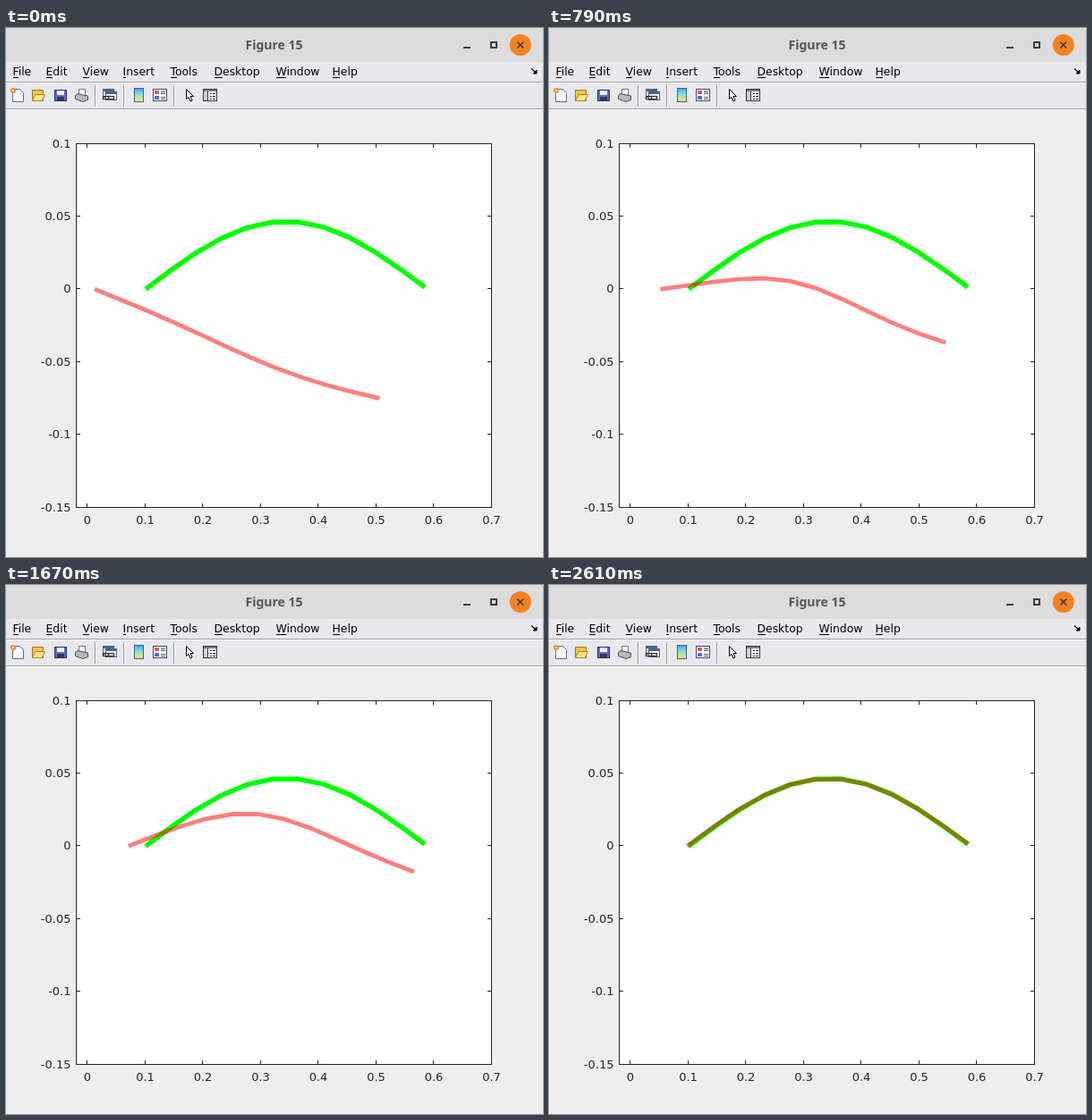
These frames come from a looping animation (600 px wide and 592 px high, 2640 ms). An HTML page with a canvas:

```html
<!DOCTYPE html>
<html>
<head>
<meta charset="utf-8">
<style>
  html, body { margin: 0; width: 100%; height: 100%; overflow: hidden; background: #eee; }
  canvas { display: block; }
</style>
</head>
<body>
<canvas id="stage" width="600" height="592"></canvas>
<script>
const ctx = document.getElementById('stage').getContext('2d');
const LOOP = 2640;
const STEPS = 10;
const STEPS_END = 2210;
const SEGMENTS = 11;
const ZERO_Y = 292.3;
const INK = '#262626';
const BOWS = [-8.7, 10, 32.7, 46, 54, 74.5];

const mix = (a, b, k) => a + (b - a) * k;
const wave = (n, u) => Math.sin(n * Math.PI * u);

// The pose jumps in steps that come quickly at both ends and slowly between.
const stepTime = n => STEPS_END * n / STEPS - 165 * wave(2, n / STEPS);

function progressAt(t) {
  let n = 0;
  while (n < STEPS && stepTime(n + 1) <= t) n++;
  return n / STEPS;
}

// A straight rod from x0 to x1 that rises by `rise`, bent by three sine modes.
function rod({ x0, x1, rise, bow, skew = 0, ripple = 0 }) {
  return Array.from({ length: SEGMENTS + 1 }, (_, i) => {
    const u = i / SEGMENTS;
    const h = rise * u + bow * wave(1, u) + skew * wave(2, u) + ripple * wave(3, u);
    return [mix(x0, x1, u), ZERO_Y - h];
  });
}

// First the tip travels to its goal, then the bow closes the remaining gap.
function movingRod(progress) {
  const k = progress * (BOWS.length - 1);
  const i = Math.min(Math.floor(k), BOWS.length - 2);
  const reach = Math.min(k, 4), late = k - reach;
  return rod({
    x0: 99 + 12.6 * reach + 5 * late,
    x1: 417.5 + 12.8 * reach,
    rise: -122 + 31.1 * reach,
    bow: mix(BOWS[i], BOWS[i + 1], k - i),
    skew: (3.5 + 0.5 * reach) * (1 - late),
    ripple: -3 * wave(1, reach / 4)
  });
}

function rect(x, y, w, h, color) {
  ctx.fillStyle = color;
  ctx.fillRect(x, y, w, h);
}

function frame(x, y, w, h, fill, stroke) {
  rect(x, y, w, h, stroke);
  rect(x + 1, y + 1, w - 2, h - 2, fill);
}

function line(points, color, width = 1) {
  ctx.beginPath();
  points.forEach(([x, y]) => ctx.lineTo(x, y));
  ctx.strokeStyle = color;
  ctx.lineWidth = width;
  ctx.stroke();
}

function poly(points, fill, stroke = fill) {
  ctx.beginPath();
  points.forEach(([x, y]) => ctx.lineTo(x, y));
  ctx.closePath();
  ctx.fillStyle = fill;
  ctx.strokeStyle = stroke;
  ctx.lineWidth = 1;
  ctx.fill();
  ctx.stroke();
}

function disc(x, y, r, color) {
  ctx.beginPath();
  ctx.arc(x, y, r, 0, Math.PI * 2);
  ctx.fillStyle = color;
  ctx.fill();
}

function text(s, x, y, font, color, align = 'left') {
  ctx.font = font;
  ctx.fillStyle = color;
  ctx.textAlign = align;
  ctx.fillText(s, x, y);
}

function titleBar() {
  rect(0, 0, 600, 38, '#dcdcdc');
  text('Figure 15', 299.5, 24, 'bold 14px "Noto Sans", sans-serif', '#555', 'center');
  rect(511, 21, 8, 2, '#3c3c3c');
  ctx.strokeStyle = '#3c3c3c';
  ctx.lineWidth = 2;
  ctx.strokeRect(542, 16, 6, 6);
  disc(574.8, 19, 12, '#f58220');
  line([[571.3, 15.5], [578.3, 22.5]], '#3c3c3c', 1.7);
  line([[578.3, 15.5], [571.3, 22.5]], '#3c3c3c', 1.7);
}

function menuBar() {
  rect(0, 38, 600, 53, '#e9e8ed');
  const items = { File: 8, Edit: 45, View: 86, Insert: 131, Tools: 184, Desktop: 233, Window: 302, Help: 365 };
  for (const [label, x] of Object.entries(items)) {
    text(label, x - 0.5, 53, '12.4px "DejaVu Sans", sans-serif', '#000');
    rect(x, 55, Math.round(ctx.measureText(label[0]).width) - 1, 1, '#000');
  }
  line([[587, 45.5], [592, 50]], '#111', 1.3);
  poly([[593, 47], [593, 51], [589, 51]], '#111');
  for (const y of [60, 90]) {
    rect(0, y, 600, 1, '#a3a2a8');
    rect(0, y + 1, 600, 1, '#fafafa');
  }
}

function fileIcons() {
  // new page
  poly([[7.5, 68.5], [15.5, 68.5], [19.5, 72.5], [19.5, 82.5], [7.5, 82.5]], '#f7fbff', '#54718f');
  disc(8, 70, 3, '#ef8a3c');
  disc(8, 70, 1.2, '#ffe48a');
  // folder
  poly([[29.5, 81.5], [29.5, 69.5], [41.5, 69.5], [41.5, 81.5]], '#f2c14e', '#a87812');
  poly([[29.5, 81.5], [33, 74.5], [43.5, 74.5], [40, 81.5]], '#ffe58c', '#b5851a');
  // disk
  frame(54, 69, 14, 13, '#5a6dc4', '#27306e');
  rect(57, 70, 8, 5, '#edf1fb');
  rect(57, 77, 8, 4, '#333a56');
  // printer
  frame(81, 68, 8, 8, '#fff', '#777');
  poly([[77.5, 75.5], [80, 73.5], [91.5, 76], [91.5, 80.5], [86, 82.5], [77.5, 79.5]], '#b9b9b9', '#4d4d4d');
}

function plotIcons() {
  // linked windows
  for (const d of [0, 3]) {
    frame(108 + d, 68 + d, 13, 10, '#fff', '#47658c');
    rect(108 + d, 68 + d, 13, 3, '#47658c');
  }
  ctx.strokeStyle = '#333';
  ctx.lineWidth = 1.3;
  for (const x of [108.5, 114.5]) ctx.strokeRect(x, 76.5, 6, 3);
  // colorbar
  const ramp = ctx.createLinearGradient(0, 68, 0, 82);
  ['#5a9bea', '#69d8f0', '#b5e5a0', '#ffe07a'].forEach((c, i) => ramp.addColorStop(i / 3, c));
  frame(143, 67, 11, 16, ramp, '#45617e');
  // legend
  frame(164, 68, 16, 14, '#fff', '#344b78');
  ['#e05a4e', '#4d6fd1'].forEach((c, i) => {
    rect(166, 70 + 6 * i, 5, 4, c);
    rect(173, 71 + 6 * i, 5, 1, '#555');
    rect(173, 73 + 6 * i, 5, 1, '#555');
  });
  // pointer
  poly([[201.5, 68.5], [201.5, 79.5], [204, 77.3], [206, 82], [208, 81], [206, 76.5], [209.5, 76.5]], '#fff', '#000');
  // inspector
  frame(220, 68, 16, 14, '#fff', '#333');
  rect(221, 69, 14, 2, '#6d7e98');
  rect(221, 71, 4, 10, '#c9d2df');
  rect(225, 71, 1, 10, '#333');
  for (let y = 73; y < 81; y += 3) {
    rect(228, y, 2, 1, '#222');
    rect(231, y, 3, 1, '#222');
  }
}

function toolBar() {
  for (const x of [99, 131, 187]) {
    rect(x, 64, 1, 24, '#98979e');
    rect(x + 1, 64, 1, 24, '#f8f8f8');
  }
  fileIcons();
  plotIcons();
}

function axes() {
  const font = '13px "DejaVu Sans", sans-serif';
  frame(78, 129, 465, 408, '#fff', INK);
  for (let i = 0; i < 8; i++) {
    const x = 90.5 + i * 64.5;
    rect(Math.floor(x), 532, 1, 5, INK);
    rect(Math.floor(x), 129, 1, 5, INK);
    text(String(i / 10), x + 0.5, 555, font, INK, 'center');
  }
  for (let i = 0; i < 6; i++) {
    const y = Math.floor(129 + i * 81.4);
    rect(78, y, 5, 1, INK);
    rect(538, y, 5, 1, INK);
    text(String((10 - 5 * i) / 100), 72.5, y + 5, font, INK, 'right');
  }
}

function draw(t) {
  rect(0, 0, 600, 592, '#eee');
  titleBar();
  menuBar();
  toolBar();
  axes();
  line(rod({ x0: 156, x1: 468, rise: 2.3, bow: 74.8 }), '#0f0', 5.5);
  line(movingRod(progressAt(t)), 'rgba(255,0,0,0.5)', 4.8);
}

const start = performance.now();
function tick() {
  draw((performance.now() - start) % LOOP);
  requestAnimationFrame(tick);
}
tick();
</script>
</body>
</html>
```
